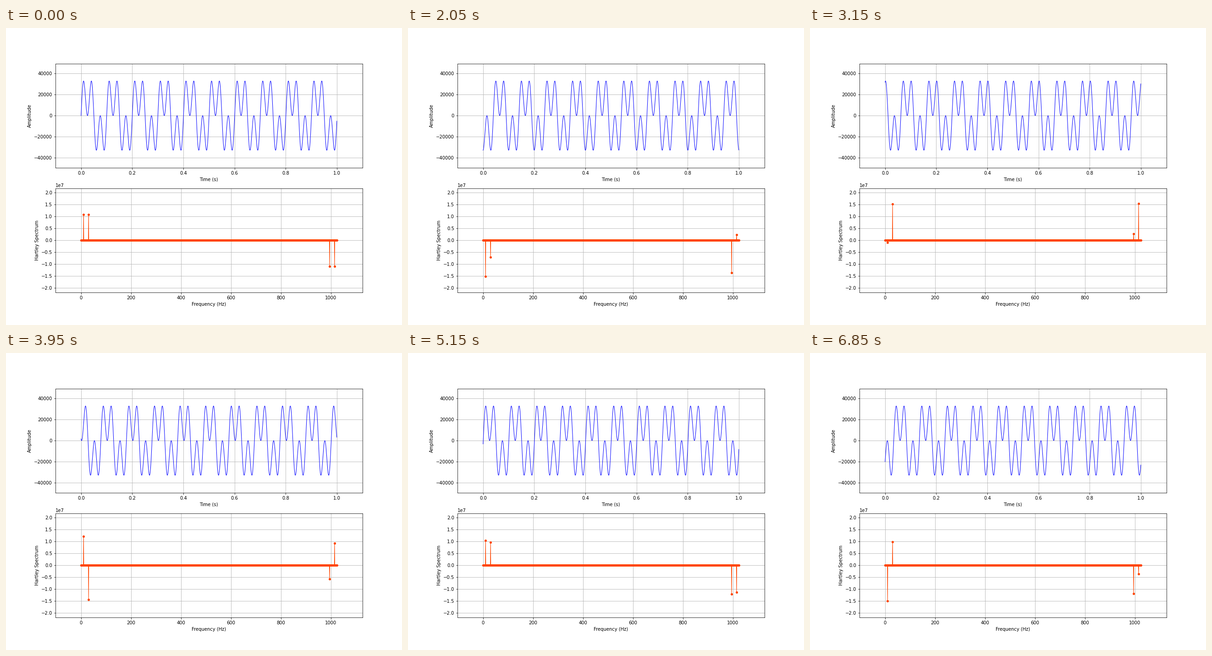
Animation of 864 by 648 pixels, one loop 6900 ms. Source, as a matplotlib script:

```python
import numpy as np
import matplotlib.pyplot as plt
from matplotlib.animation import FuncAnimation

RATE = 1024          # samples per second, one second shown
TONES = (10, 30)     # Hz
PEAK = 32767
FRAMES, INTERVAL = 138, 50


def make_signal():
    t = np.arange(RATE) / RATE
    wave = sum(np.sin(2 * np.pi * f * t) for f in TONES)
    return np.round(wave / np.abs(wave).max() * PEAK)


def hartley(x):
    spec = np.fft.fft(x)
    return spec.real - spec.imag


def setup(ax, xmax, ymax, xlabel, ylabel):
    ax.set_xlim(-0.1 * xmax, 1.1 * xmax)
    ax.set_ylim(-ymax, ymax)
    ax.set_xlabel(xlabel)
    ax.set_ylabel(ylabel)
    ax.grid(True)


signal = make_signal()
times = np.linspace(0, 1, RATE)
freqs = np.linspace(0, RATE, RATE)

fig, (ax_wave, ax_spec) = plt.subplots(2, 1, figsize=(12, 9), dpi=72)
setup(ax_wave, 1, 1.5 * PEAK, "Time (s)", "Amplitude")
setup(ax_spec, RATE, 2 * hartley(signal).max(),
      "Frequency (Hz)", "Hartley Spectrum")

wave_line, = ax_wave.plot(times, signal, color="blue", lw=1)
spec_line, = ax_spec.plot(freqs, hartley(signal), "o-", color="orangered",
                          lw=1, ms=4)


def update(i):
    # the wave travels right by one sample per step
    x = np.roll(signal, i)
    wave_line.set_ydata(x)
    spec_line.set_ydata(hartley(x))
    return wave_line, spec_line


anim = FuncAnimation(fig, update, frames=FRAMES, interval=INTERVAL,
                     repeat=True, repeat_delay=0)
plt.show()
```
